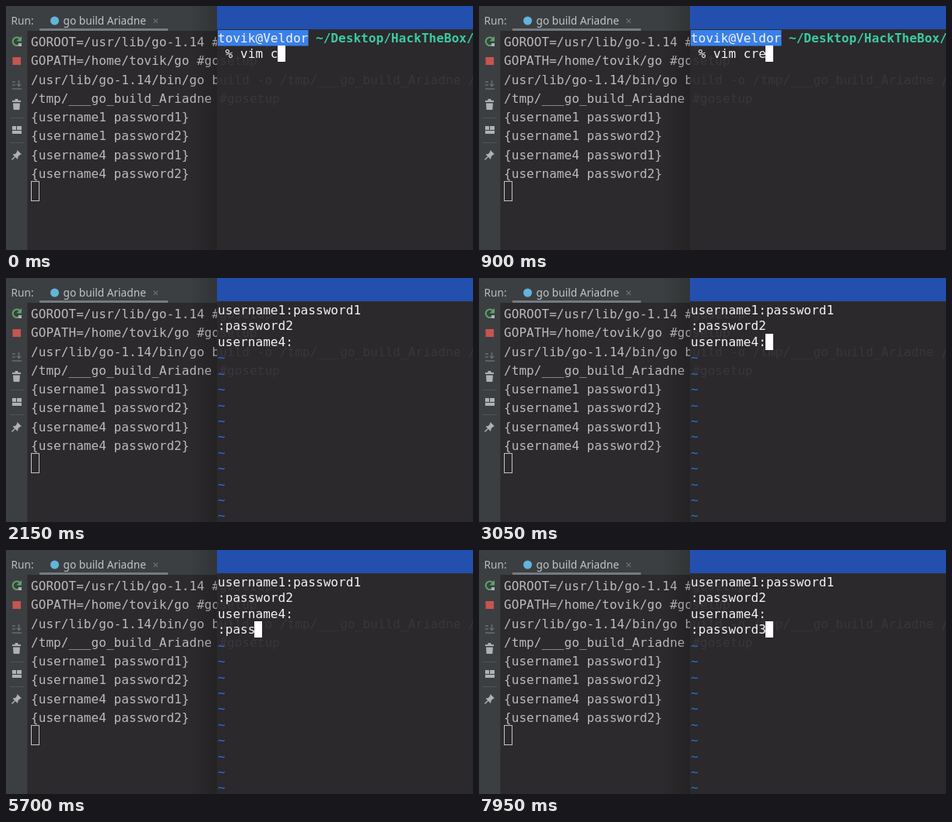
Animation, 600 px wide and 315 px high, one loop 8 s. Source, as an HTML page with a canvas:

```html
<!DOCTYPE html>
<html lang="en">
<head>
<meta charset="utf-8">
<title>Go run panel and terminal</title>
<style>
html, body { margin: 0; width: 100%; height: 100%; overflow: hidden; background: #2c2a2c; }
canvas { display: block; }
</style>
</head>
<body>
<canvas id="stage" width="600" height="315"></canvas>
<script>
const ctx = document.getElementById('stage').getContext('2d');
const LOOP = 8000, BLINK = 600;
const MONO = '16px "DejaVu Sans Mono", monospace';
const UI = '13.7px "Noto Sans", sans-serif';
const CELL = 9.69, ROW = 20.42, TERM_X = 272, TERM_Y = 31;

const USER = 'tovik', HOST = 'Veldor';
const OUTPUT = [
  'GOROOT=/usr/lib/go-1.14 #gosetup',
  `GOPATH=/home/${USER}/go #gosetup`,
  '/usr/lib/go-1.14/bin/go build -o /tmp/___go_build_Ariadne /',
  '/tmp/___go_build_Ariadne #gosetup',
  '{username1 password1}',
  '{username1 password2}',
  '{username4 password1}',
  '{username4 password2}'
];
const FILE = ['username1:password1', ':password2', 'username4:'];

// Shell input and the keys typed on the new line, with their times.
const SHELL = [[0, 'c'], [350, 'cr'], [750, 'cre'], [1150, 'creds']];
const VIM_OPENS = 1450, NEW_LINE = 3450;
const MOVES = [[VIM_OPENS, 0, 0], [2700, 0, 1], [2850, 0, 2], [3050, 10, 2], [NEW_LINE, 0, 3]];
const LAST_LINE = ':password3';
const KEY_TIMES = [5300, 5400, 5480, 5570, 5650, 5950, 6100, 6250, 6400, 7700];

const latest = (list, t) => list.filter(e => e[0] <= t).pop();

function rect(x, y, w, h, color) {
  ctx.fillStyle = color;
  ctx.fillRect(x, y, w, h);
}

function path(d, color, width = 1.5) {
  ctx.strokeStyle = color;
  ctx.lineWidth = width;
  ctx.stroke(new Path2D(d));
}

function shape(d, color) {
  ctx.fillStyle = color;
  ctx.fill(new Path2D(d));
}

// Monospaced text on a fixed character grid.
function mono(text, x, y, color, weight = '') {
  ctx.font = `${weight} ${MONO}`;
  ctx.fillStyle = color;
  [...text].forEach((ch, i) => ctx.fillText(ch, x + i * CELL, y));
}

function label(text, x, y, color) {
  ctx.font = UI;
  ctx.fillStyle = color;
  ctx.fillText(text, x, y);
}

function term(text, col, row, color = '#f4f4f4', weight) {
  mono(text, TERM_X + col * CELL, TERM_Y + 16 + row * ROW, color, weight);
}

function cursor(col, row, under = '') {
  rect(Math.floor(TERM_X + col * CELL - 0.5), Math.round(TERM_Y + row * ROW), 10, 21, '#ffffff');
  term(under, col, row, '#2b2a2b');
}

function drawIcons() {
  const grey = '#afb1b3', dim = '#6a6d6f';
  path('M18.5 43 A5.3 5.3 0 1 0 18.5 48.5', '#59a869', 2);
  shape('M20 39 V45.5 H13.5 Z', '#59a869');
  rect(16, 48, 4, 4, grey);
  rect(8.5, 66, 10.5, 10, '#c75450');
  path('M8 98 H12 M8 102 H12 M8 107 H20 M16.5 96 V103 M14 101 L16.5 103.5 L19 101', dim);
  path('M8 123 H19 M11.5 121 H15.5', grey, 2);
  shape('M9 125.5 H18 L17.3 134 H9.7 Z', grey);
  rect(5, 144, 18, 1, '#515456');
  rect(8, 155, 5, 5, grey);
  rect(14, 155, 6, 5, grey);
  rect(8, 161, 12, 4, grey);
  rect(5, 176, 18, 1, '#515456');
  shape('M14.5 186 L20 191.5 L18 192 L15.5 194.5 L15 198 L8.5 191.5 L12 191 L14 188.5 Z', grey);
  path('M11.5 194.5 L7.5 198.5', grey);
}

function drawRunPanel() {
  rect(0, 0, 600, 315, '#2c2a2c');
  rect(0, 0, 600, 32, '#3c3f41');
  rect(0, 32, 27, 283, '#3c3f41');
  rect(27, 32, 1, 283, '#323232');
  rect(43, 29, 165, 3, '#747a80');
  label('Run:', 6.5, 24, '#bbbbbb');
  label('go build Ariadne', 73.5, 24, '#c2c4c5');
  shape('M57 19 a5.5 5.5 0 1 0 11 0 a5.5 5.5 0 1 0 -11 0', '#62b5d8');
  path('M189.5 16.5 L195 22 M195 16.5 L189.5 22', '#6b6e70', 1.1);
  drawIcons();
  OUTPUT.forEach((line, i) => mono(line, 32, 52 + i * 24.27, '#bbbbbb'));
  ctx.strokeStyle = '#c4c4c4';
  ctx.lineWidth = 1;
  ctx.strokeRect(32.5, 226.5, 10, 25);
}

function drawTerminalWindow() {
  const shadow = ctx.createLinearGradient(235, 0, 271, 0);
  shadow.addColorStop(0, 'rgba(0,0,0,0)');
  shadow.addColorStop(1, 'rgba(0,0,0,.18)');
  rect(235, 0, 36, 315, shadow);
  rect(271, 0, 329, 315, 'rgba(43,41,43,.91)');
  rect(271, 0, 329, 30, '#234fae');
}

function drawShell(t) {
  const prompt = `${USER}@${HOST}`;
  const command = ' % vim ' + latest(SHELL, t)[1];
  rect(TERM_X, TERM_Y, 116.5, 20.5, '#3a80ea');
  term(prompt, 0, 0);
  term('~/Desktop/HackTheBox/', 13, 0, '#3acba5', 'bold');
  term(command, 0, 1);
  cursor(command.length, 1);
}

function drawVim(t) {
  const typed = KEY_TIMES.filter(k => k <= t).length;
  const lines = t < NEW_LINE ? FILE : [...FILE, LAST_LINE.slice(0, typed)];
  lines.forEach((line, row) => term(line, 0, row));
  for (let row = lines.length; row < 14; row++) term('~', 0, row, '#2f6ee0');

  const [moved, col, row] = latest(MOVES, t);
  const lastKey = typed ? KEY_TIMES[typed - 1] : moved;
  const lit = Math.floor((t - lastKey) / BLINK) % 2 === 0;
  if (lit) cursor(col + typed, row, lines[row][col + typed]);
}

function draw(now) {
  const t = now % LOOP;
  drawRunPanel();
  drawTerminalWindow();
  if (t < VIM_OPENS) drawShell(t);
  else drawVim(t);
  requestAnimationFrame(draw);
}
requestAnimationFrame(draw);
</script>
</body>
</html>
```
